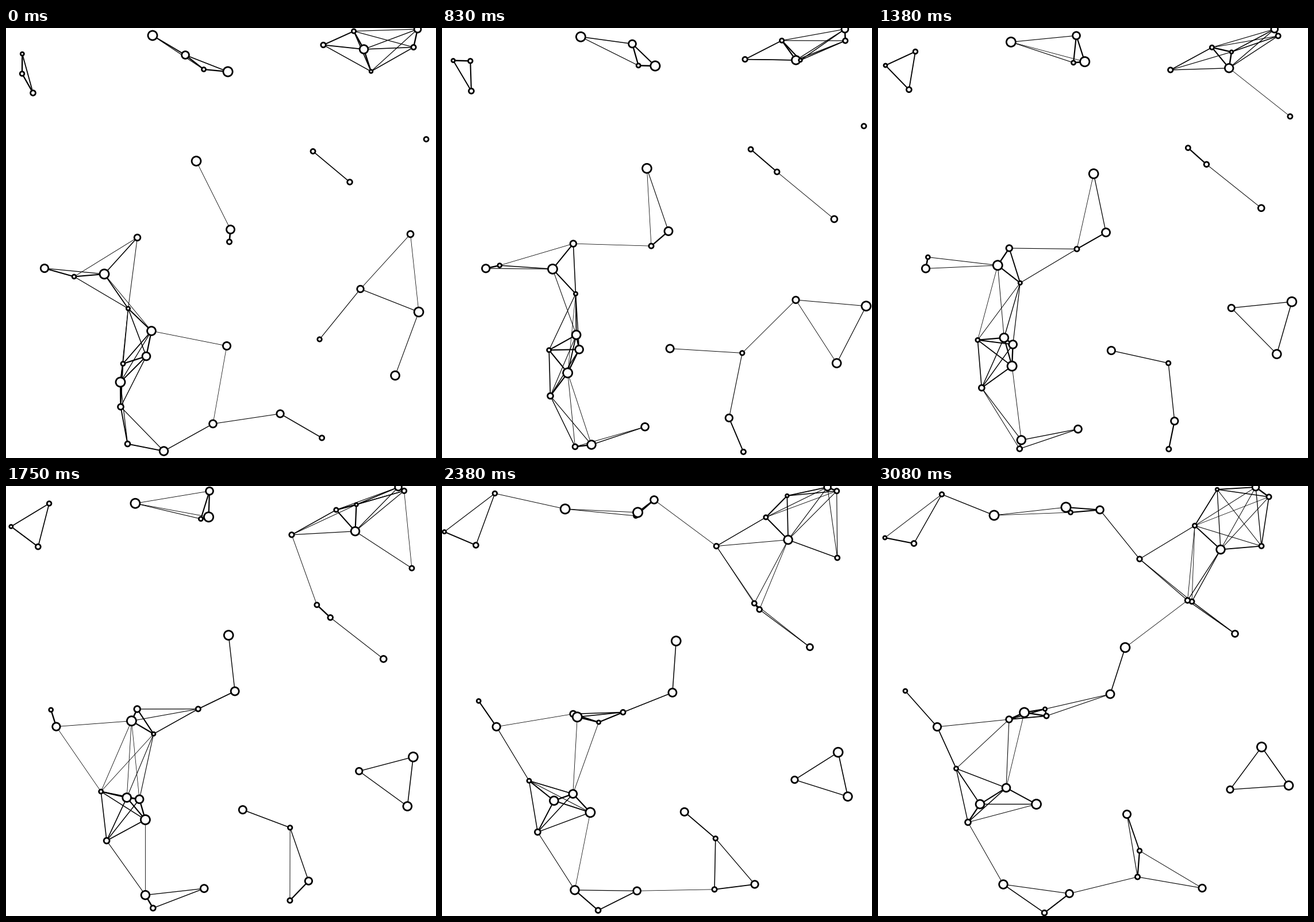
A matplotlib script that plays this animation: 748 by 748 pixels, repeating every 3.12 s.

```python
import numpy as np
import matplotlib.pyplot as plt
from matplotlib.animation import FuncAnimation
from matplotlib.collections import LineCollection

SIZE = 748
DPI = 100
PX = 72 / DPI          # points per pixel
FRAMES = 75
LOOP_MS = 3120
REACH = 138.5          # nodes closer than this are linked
RING = 2.8             # node outline
THICK, THIN = 2.9, 0.75

# Where each node starts, and where it would end if there were no walls.
START = np.array([
    (28.3, 45), (28, 79.5), (47, 113), (255, 13), (312, 47),
    (344, 72), (386, 76), (552, 29.5), (605, 5.5), (622.5, 37),
    (635, 75.5), (716, 2), (709, 33.5), (731, 193.5), (534, 214.5),
    (598, 268), (703.5, 358.5), (616.5, 454), (718, 494), (677, 604.5),
    (545.5, 541.5), (331, 231.5), (390.5, 350.5), (388.5, 372), (228.5, 364.5),
    (67, 418), (118.5, 432.5), (171, 428), (212.5, 488), (253, 527),
    (244, 571), (203.5, 584), (199, 616), (199.5, 659), (211.5, 723.5),
    (274.5, 736), (360, 688.5), (384, 553), (477, 671), (549.5, 713),
])
END = np.array([
    (-6, 90), (111, -6.9), (62.5, 100), (202, -35), (386, -28.7),
    (335, 46), (327, 37), (455, 127), (551, 69), (596, 110.5),
    (590, -0.4), (657, 2), (680, -10.7), (821, 104.5), (546, 201),
    (538.5, 199), (621, 257), (612.5, 528), (812.9, 454), (714.5, 521),
    (455, 634.5), (430, 281), (404, 362), (293, 400), (228, 406),
    (103, 419), (47.5, 356.5), (254.5, 394), (290.5, 388), (177.5, 553.5),
    (223, 525), (136, 491.5), (275.5, 553.5), (156.5, 585), (289.5, 742.5),
    (218, 693), (333, 709), (433, 571), (564, 699.5), (451.5, 807.8),
])
RADII = np.array([
    3, 3.8, 4.4, 8, 6.4, 3.5, 8.1, 4.2, 3.6, 7.3,
    2.8, 5.9, 4.1, 4, 4, 4.3, 5.4, 5.7, 7.9, 7.4,
    3.7, 7.9, 7, 4.1, 5.3, 6.7, 3.4, 8, 3.1, 7.4,
    6.9, 3.5, 8, 4.9, 4.4, 7.3, 6.4, 6.6, 6.2, 4.1,
])

LOW = np.minimum(RADII[:, None], START)
HIGH = SIZE - RADII[:, None]
I, J = np.triu_indices(len(START), 1)


def positions(frame):
    """Straight travel, reflected off the walls."""
    p = START + (END - START) * frame / (FRAMES - 1)
    p = LOW + np.abs(p - LOW)
    return HIGH - np.abs(HIGH - p)


fig = plt.figure(figsize=(SIZE / DPI, SIZE / DPI), dpi=DPI, facecolor="white")
ax = fig.add_axes([0, 0, 1, 1])
ax.set_xlim(0, SIZE)
ax.set_ylim(SIZE, 0)
ax.axis("off")

links = LineCollection([], colors="black", zorder=1)
links.set_snap(False)
ax.add_collection(links, autolim=False)
nodes = ax.scatter(START[:, 0], START[:, 1], s=(2 * RADII * PX) ** 2,
                   facecolors="white", edgecolors="black",
                   linewidths=RING * PX, zorder=2)


def draw(frame):
    p = positions(frame)
    dist = np.hypot(*(p[I] - p[J]).T)
    near = dist < REACH
    links.set_segments(np.stack([p[I[near]], p[J[near]]], axis=1))
    links.set_linewidths((THICK + (THIN - THICK) * dist[near] / REACH) * PX)
    nodes.set_offsets(p)
    return links, nodes


anim = FuncAnimation(fig, draw, frames=FRAMES, interval=LOOP_MS / FRAMES,
                     repeat=True, repeat_delay=0)
plt.show()
```
